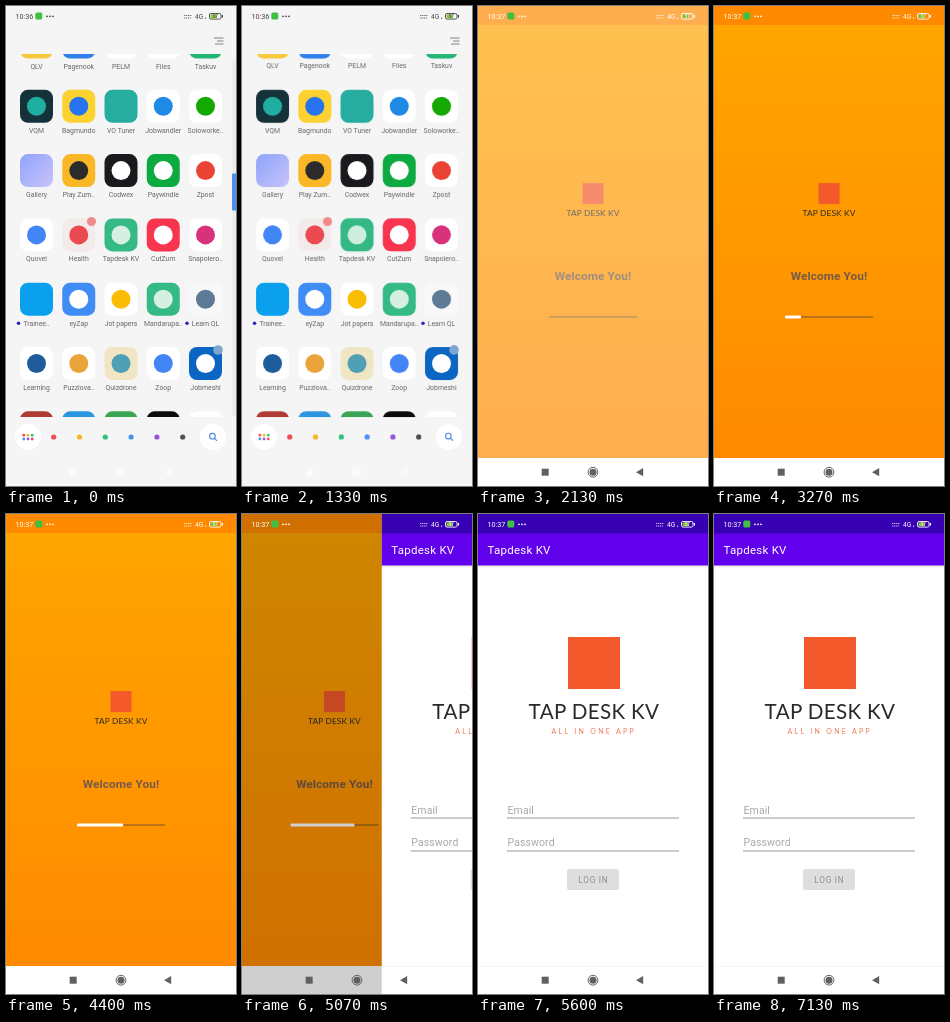
Write an HTML page that moves like this. It is 230 px wide and 480 px high and loops after 7.47 s.

```html
<!DOCTYPE html>
<html lang="en">
<head>
<meta charset="utf-8">
<title>App launch</title>
<style>
html, body { margin: 0; width: 100%; height: 100%; overflow: hidden; background: #fff; }
svg { display: block; width: 230px; height: 480px; font-family: Roboto, Arial, sans-serif; }
.lato { font-family: Lato, Roboto, sans-serif; }
.mid { text-anchor: middle; }

.thumb, .home, .win, .splash, .old, .dim, .bar, .login, .status, .early, .late, .nav {
  animation: 7470ms linear infinite;
}
.thumb { animation-name: thumb; }
.home { animation-name: home; transform-origin: 115px 240px; }
.win { animation-name: win; }
.splash { animation-name: splash; }
.old { animation-name: old; }
.dim { animation-name: dim; }
.bar { animation-name: bar; }
.login { animation-name: login; }
.status { animation-name: status; }
.early { animation-name: early; }
.late { animation-name: late; }
.nav { animation-name: nav; }

@keyframes thumb { 0%, .9% { opacity: 1; } 2.7%, 100% { opacity: 0; } }
@keyframes home {
  0%, 17.8% { opacity: 1; transform: scale(1); }
  23.4%, 100% { opacity: 0; transform: scale(.92); }
}
@keyframes win {
  0%, 17.8% {
    x: 98.5px; y: 212.5px; width: 33px; height: 33px; rx: 7px; fill: #35b985; opacity: 0;
    animation-timing-function: cubic-bezier(.25, .6, .3, 1);
  }
  18.7% { opacity: 1; }
  21% { fill: #fefefe; }
  24.1%, 100% { x: 0px; y: 0px; width: 230px; height: 480px; rx: 0px; fill: #fefefe; opacity: 1; }
}
@keyframes splash {
  0%, 27.44% { opacity: 0; }
  28.51% { opacity: .69; }
  30.39%, 100% { opacity: 1; }
}
@keyframes bar {
  0%, 33.07% { width: 0px; }
  43.78% { width: 16px; }
  67.87% { width: 64px; }
  73.6%, 100% { width: 75px; }
}
/* page change: quadratic ease-out shared by all three parts */
@keyframes old {
  0%, 66.27% { transform: translateX(0); animation-timing-function: cubic-bezier(.333, .667, .667, 1); }
  73.6%, 100% { transform: translateX(-57.5px); }
}
@keyframes dim {
  0%, 66.27% { opacity: 0; animation-timing-function: cubic-bezier(.333, .667, .667, 1); }
  73.6%, 100% { opacity: .48; }
}
@keyframes login {
  0%, 66.27% { transform: translateX(230px); animation-timing-function: cubic-bezier(.333, .667, .667, 1); }
  73.6%, 100% { transform: translateX(0); }
}
@keyframes status {
  0%, 18.7% { color: #444; }
  23%, 27.44% { color: #ebebeb; }
  28.51%, 100% { color: #fff; }
}
@keyframes early { 0%, 28.2% { opacity: 1; } 28.21%, 100% { opacity: 0; } }
@keyframes late { 0%, 28.2% { opacity: 0; } 28.21%, 100% { opacity: 1; } }
@keyframes nav { 0%, 19.5% { color: #fbfbfb; } 24%, 100% { color: #606060; } }
</style>
</head>
<body>
<svg viewBox="0 0 230 480">
  <defs>
    <linearGradient id="sun" x2="0" y2="1">
      <stop stop-color="#ffa500"/><stop offset="1" stop-color="#ff8a00"/>
    </linearGradient>
    <linearGradient id="shade" x2="0" y2="1">
      <stop stop-color="#000" stop-opacity=".1"/><stop offset="1" stop-color="#000" stop-opacity="0"/>
    </linearGradient>
    <linearGradient id="sky" x2="1" y2="1">
      <stop stop-color="#8fa4fa"/><stop offset="1" stop-color="#c9c3fb"/>
    </linearGradient>
    <clipPath id="list"><rect y="48" width="230" height="363"/></clipPath>
    <g id="brand">
      <rect x="-26" y="-27" width="52" height="52" fill="#f4592b"/>
      <text class="lato mid" y="55" font-size="20.6" letter-spacing=".35" fill="#2a2a2a">TAP DESK KV</text>
    </g>
  </defs>

  <rect width="230" height="480" fill="#f5f5f5"/>
  <g class="home">
    <path d="M208 32h9.5M211 35h6.5M209 38h8.5" stroke="#666" stroke-width=".8"/>
    <g id="grid" clip-path="url(#list)"></g>
    <g class="thumb">
      <rect x="226" y="54" width="4" height="356" fill="#ededed"/>
      <rect x="226" y="167.5" width="4.5" height="37" rx="1" fill="#4a8fe8"/>
    </g>
    <g id="dock">
      <circle cx="22" cy="431" r="13" fill="#fff"/>
      <circle cx="207" cy="431" r="13" fill="#fff"/>
      <circle cx="206.4" cy="430.2" r="2.8" fill="none" stroke="#4a86e0" stroke-width="1.1"/>
      <path d="M208.5 432.3l2.5 2.5" stroke="#4a86e0" stroke-width="1.2"/>
    </g>
  </g>

  <rect class="win"/>

  <g class="splash">
    <g class="old">
      <rect width="230" height="20" fill="#ff8a00"/>
      <rect y="19" width="230" height="433" fill="url(#sun)"/>
      <rect y="452" width="290" height="28" fill="#fff"/>
      <use href="#brand" transform="translate(115 188) scale(.405)"/>
      <text class="mid" x="115" y="274" font-size="11.8" font-weight="700" letter-spacing=".1" fill="#755a4a">Welcome You!</text>
      <rect x="71" y="310" width="88" height="2" fill="#bd7415"/>
      <rect class="bar" x="71" y="309.5" height="3" rx="1" fill="#fff"/>
    </g>
    <rect class="dim" width="230" height="480" fill="#000"/>
  </g>

  <g class="login">
    <rect width="230" height="480" fill="#fff"/>
    <rect y="51.5" width="230" height="3" fill="url(#shade)"/>
    <rect width="230" height="20" fill="#3700b3"/>
    <rect y="19.5" width="230" height="32" fill="#6100eb"/>
    <text x="9.5" y="40" font-size="11.5" letter-spacing=".25" fill="#fff">Tapdesk KV</text>
    <use href="#brand" transform="translate(116 150)"/>
    <text class="lato mid" x="115.8" y="220" font-size="7" letter-spacing="2.3" fill="#f27a58">ALL IN ONE APP</text>
    <g font-size="10.5" letter-spacing=".1" fill="#a8a8a8">
      <text x="29.5" y="300">Email</text>
      <text x="29.5" y="331.7">Password</text>
    </g>
    <path d="M29 304h172M29 337h172" stroke="#989898"/>
    <rect x="89" y="355" width="52" height="21" rx="2" fill="#dedede"/>
    <text class="mid" x="115.4" y="368.6" font-size="8.3" letter-spacing=".75" fill="#8f8f8f">LOG IN</text>
    <path d="M0 452.5h230" stroke="#f6f6f6"/>
  </g>

  <g class="status" fill="currentColor">
    <g font-size="7.2">
      <text class="early" x="9.5" y="13">10:36</text>
      <text class="late" x="9.5" y="13">10:37</text>
      <text x="189" y="12.8" font-size="6.6">4G</text>
    </g>
    <rect x="29.3" y="6.5" width="7" height="7" rx="1.5" fill="#3fc043"/>
    <circle cx="41" cy="10.3" r=".9"/><circle cx="44" cy="10.3" r=".9"/><circle cx="47" cy="10.3" r=".9"/>
    <path d="M178 9.5h8M178 12h7" stroke="currentColor" stroke-width="1.2" stroke-dasharray="1.3 .6" opacity=".7"/>
    <circle cx="199.6" cy="12.2" r=".6"/>
    <rect x="203.5" y="7.5" width="11.5" height="5.6" rx="1.5" fill="none" stroke="currentColor" stroke-width=".9"/>
    <rect x="204.5" y="8.4" width="6.3" height="3.8" rx=".6" fill="#86c440"/>
    <text class="mid" x="209.3" y="12" font-size="4.6">57</text>
    <rect x="215.8" y="9" width="1.2" height="2.6"/>
  </g>

  <g class="nav" fill="currentColor">
    <rect x="63.7" y="462.7" width="7" height="7"/>
    <circle cx="115" cy="466.2" r="3.5"/>
    <circle cx="115" cy="466.2" r="4.9" fill="none" stroke="currentColor" stroke-width="1"/>
    <path d="M158 466.2l7.2-4.1v8.2z"/>
  </g>
</svg>
<script>
const NS = 'http://www.w3.org/2000/svg';
const grid = document.getElementById('grid');
const dock = document.getElementById('dock');

function add(parent, tag, attrs, text) {
  const el = document.createElementNS(NS, tag);
  for (const key in attrs) el.setAttribute(key, attrs[key]);
  if (text) el.textContent = text;
  parent.append(el);
}
const dot = (parent, cx, cy, r, fill) => add(parent, 'circle', { cx, cy, r, fill });

// label, tile colour, mark colour
const rows = [
  ['QLV #f7c93c', 'Pagenook #2f80ed', 'PELM #fff #e8b23c', 'Files #fff #f0b429', 'Taskuv #22b573'],
  ['VQM #15323a #1fae9f', 'Bagmundo #fbd230 #2874f0', 'VO_Tuner #26ada0', 'Jobwandler #fff #1e8ae6', 'Soloworke.. #fff #14a800'],
  ['Gallery url(#sky)', 'Play_Zum.. #fbb826 #2b2b2b', 'Codwex #1a1a1e #fff', 'Paywindle #0caa41 #fff', 'Zpost #fff #ea4335'],
  ['Quovel #fff #4285f4', 'Health #f3eaea #ea4a50', 'Tapdesk_KV #35b985 #d5f0e3', 'CutZum #f9344f #fff', 'Snapolero.. #fff #d8327c'],
  ['Trainee.. #0aa0ee', 'eyZap #3f8cf5 #fff', 'Jot_papers #fff #fbbc04', 'Mandarupa.. #35b985 #d5f0e3', 'Learn_QL #f8f8f8 #5d7b96'],
  ['Learning #fff #1f5c9c', 'Puzzlova.. #fff #eba43a', 'Quizdrone #f1e6c4 #4f9fb5', 'Zoop #fff #4285f4', 'Jobmeshi #0a66c2 #fff'],
  [' #b03a34', ' #2a96e0', ' #3aa655', ' #0c0c0c', ' #fff']
];

rows.forEach((row, r) => row.forEach((item, c) => {
  const [name, tile, mark] = item.split(' ');
  const x = 30.5 + 42.25 * c, y = 36 + 64.3 * r;
  add(grid, 'rect', { x: x - 16.5, y: y - 16.5, width: 33, height: 33, rx: 8, fill: tile });
  if (mark) dot(grid, x, y, 9.5, mark);
  add(grid, 'text', { x, y: y + 26.5, class: 'mid', 'font-size': 6.9, fill: '#666' }, name.replace('_', ' '));
}));
dot(grid, 85.5, 215.5, 4.5, '#f08a8a');
dot(grid, 212, 344, 4.8, '#7fa6cf');
dot(grid, 12.5, 317.3, 1.8, '#2626b8');
dot(grid, 181, 317.3, 1.8, '#2626b8');

const hues = ['#ee4b55', '#f4b922', '#2dc07a', '#4a90f0', '#9356d8', '#505050'];
hues.forEach((fill, i) => dot(dock, 47.7 + 25.8 * i, 431, 2.6, fill));
for (let i = 0; i < 6; i++) {
  dot(dock, 17.8 + 4.2 * (i % 3), 429.2 + 3.8 * Math.floor(i / 3), 1.4, hues[i % 5]);
}
</script>
</body>
</html>
```
